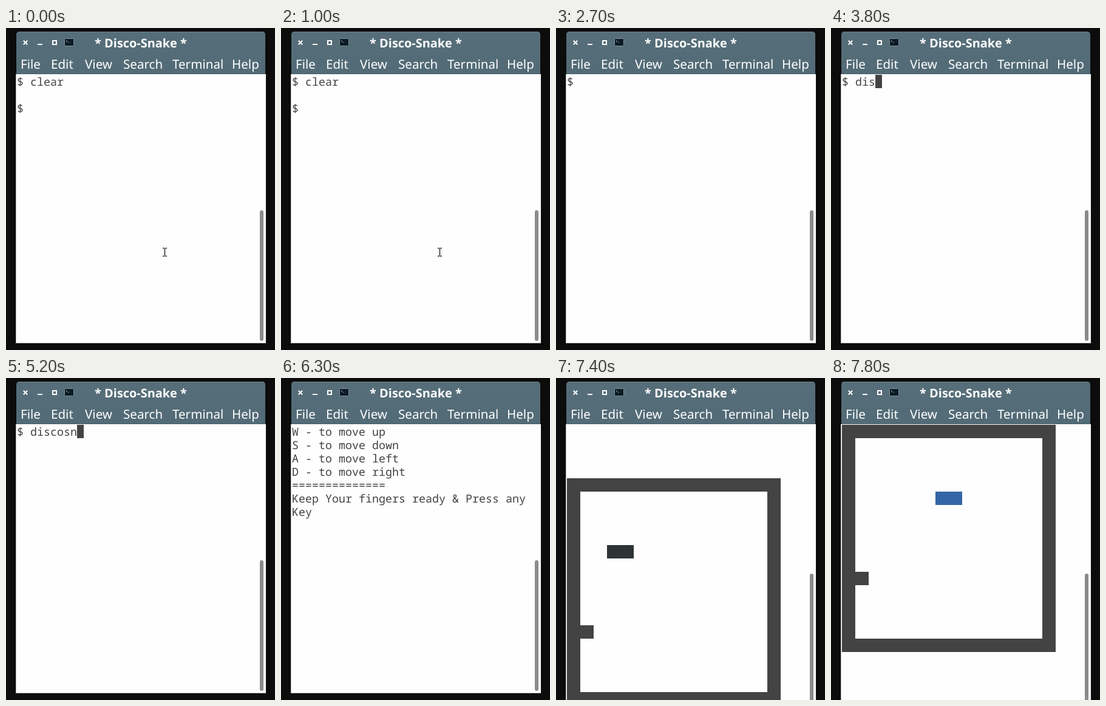
Animation, 443 px wide and 530 px high, one loop 8 s. Source, as an HTML page:

```html
<!DOCTYPE html>
<html lang="en">
<head>
<meta charset="utf-8">
<title>Disco-Snake</title>
<style>
  html, body { margin: 0; width: 100%; height: 100%; overflow: hidden; background: #0c0c0c; }
  svg { display: block; }
  text { white-space: pre; text-rendering: geometricPrecision; }
  .mono { font: 18.333px "Noto Sans Mono", monospace; fill: #434343; }
  .menu { font: 20.6px "Noto Sans", sans-serif; fill: #fff; }
  .title { font: bold 19.9px "Noto Sans", sans-serif; fill: #fff; }
</style>
</head>
<body>
<svg width="443" height="530" viewBox="0 0 443 530">
  <defs>
    <linearGradient id="bar" x1="0" y1="0" x2="0" y2="1">
      <stop offset="0" stop-color="#566e79"/>
      <stop offset="1" stop-color="#526b76"/>
    </linearGradient>
  </defs>
  <rect width="443" height="530" fill="#0c0c0c"/>
  <rect id="edge" x="16" y="76" width="412" height="443" fill="#b5b5b5"/>
  <rect id="page" x="17" y="76" width="411" height="442" fill="#fefefe"/>

  <g id="game">
    <path d="M0 0H352V374H0ZM22 22V352H330V22Z" fill="#434343" fill-rule="evenodd"/>
    <rect x="22" y="242" width="22" height="22" fill="#434343"/>
    <rect id="snake" y="110" width="44" height="22"/>
  </g>
  <g id="lines" class="mono"></g>
  <rect id="cursor" width="11" height="22" fill="#434343"/>
  <rect id="thumb" x="418" width="6" height="215" rx="3" fill="#8b8b8b"/>

  <path d="M17 76V11Q17 6 22 6H422Q427 6 427 11V76Z" fill="url(#bar)"/>
  <path d="M20 6.5H424" stroke="#6f858f"/>
  <path d="M17 75.5H427" stroke="#48606b"/>
  <g fill="none" stroke="#fff" stroke-width="2">
    <path d="M28.8 20.8L35.2 27.2M35.2 20.8L28.8 27.2M52 27H60"/>
    <rect x="77" y="21" width="6" height="6"/>
  </g>
  <rect x="96.5" y="17.5" width="15" height="12" rx="1" fill="#0b1a24" stroke="#7e929b"/>
  <path d="M99 20.5l2 1.2l-2 1.2M102 23.5h2" fill="none" stroke="#a9b6bc" stroke-width=".8"/>
  <text class="title" x="222" y="31.5" text-anchor="middle">* Disco-Snake *</text>
  <g id="menu" class="menu"></g>

  <g id="pointer" fill="none">
    <path d="M258 362.5H260.5L261.5 363.5L262.5 362.5H265M261.5 363V375M258 375.5H260.5L261.5 374.5L262.5 375.5H265" stroke="#bbb" stroke-width="2.4"/>
    <path d="M258 362.5H260.5L261.5 363.5L262.5 362.5H265M261.5 363V375M258 375.5H260.5L261.5 374.5L262.5 375.5H265" stroke="#222"/>
  </g>
</svg>
<script>
const LOOP = 8000, LEFT = 18, TOP = 77, COL = 11, ROW = 22, BLINK = 600;
const $ = id => document.getElementById(id);
const set = (el, attrs) => { for (const k in attrs) el.setAttribute(k, attrs[k]); };
const show = (el, on) => set(el, { visibility: on ? 'visible' : 'hidden' });

function addText(parent, x, y, str = '') {
  const el = document.createElementNS('http://www.w3.org/2000/svg', 'text');
  set(el, { x, y });
  el.textContent = str;
  $(parent).append(el);
  return el;
}

Object.entries({ File: 24, Edit: 74, View: 130, Search: 193, Terminal: 274, Help: 372 })
  .forEach(([name, x]) => addText('menu', x, 66.5, name));
const lines = Array.from({ length: 8 }, (_, i) => addText('lines', LEFT, TOP + ROW * i + 18));

const CLEAR = [1300, 1500, 1700, 1800, 1900];
const DISCO = [3200, 3500, 3800, 3900, 4200, 4800, 5200, 5300, 5400, 5700];
const HELP = ['W - to move up', 'S - to move down', 'A - to move left', 'D - to move right',
  '='.repeat(14), 'Keep Your fingers ready & Press any', 'Key', ''];
const PALETTE = ['#2e3436', '#cc0000', '#4e9a06', '#c4a000', '#3465a4', '#75507b', '#06989a', '#d3d7cf'];
const RESIZE = 7200, START = 7300, SCROLL_END = 7800;

// Moments that restart the cursor blink
const WAKES = [300, ...CLEAR, 2100, ...DISCO, 5800, 6900, RESIZE];

const typed = (word, keys, t) => '$ ' + word.slice(0, keys.filter(k => k <= t).length);

function screen(t) {
  if (t >= RESIZE) return [''];
  if (t >= 6000) return HELP;
  if (t >= 5800) return ['$ discosnake', ''];
  if (t >= 2100) return [typed('discosnake', DISCO, t)];
  return ['$ clear', '', typed('clear', CLEAR, t)];
}

function cursorOn(t) {
  if (t < 300 || t >= START) return false;
  const wake = t >= 5800 && t < 6300 ? t : WAKES.filter(k => k <= t).pop();
  return Math.floor((t - wake) / BLINK) % 2 === 0;
}

function drawGame(t) {
  const on = t >= START;
  show($('game'), on);
  show($('snake'), on);
  if (!on) return;
  const step = Math.floor((t - 7400) / 100);
  const up = Math.min(step, (SCROLL_END - 7400) / 100);
  set($('game'), { transform: `translate(${LEFT} ${165 - up * ROW})` });
  set($('snake'), { x: (3 + up) * ROW, fill: PALETTE[(up + 8) % 8] });
}

function draw(t) {
  const rows = screen(t), last = rows.length - 1;
  lines.forEach((el, i) => {
    const str = rows[i] || '';
    if (el.textContent !== str) el.textContent = str;
  });
  const shown = cursorOn(t) && !(t >= 6300 && t < 6900);
  set($('cursor'), { x: LEFT + rows[last].length * COL, y: TOP + last * ROW });
  show($('cursor'), shown);
  show($('pointer'), t < CLEAR[0]);

  const tall = t >= RESIZE;
  set($('edge'), { height: tall ? 460 : 443 });
  set($('page'), { height: tall ? 460 : 442 });
  set($('thumb'), { y: tall ? 322 : 300 });
  drawGame(t);
}

const begin = performance.now();
function tick() {
  draw((performance.now() - begin) % LOOP);
  requestAnimationFrame(tick);
}
tick();
</script>
</body>
</html>
```
